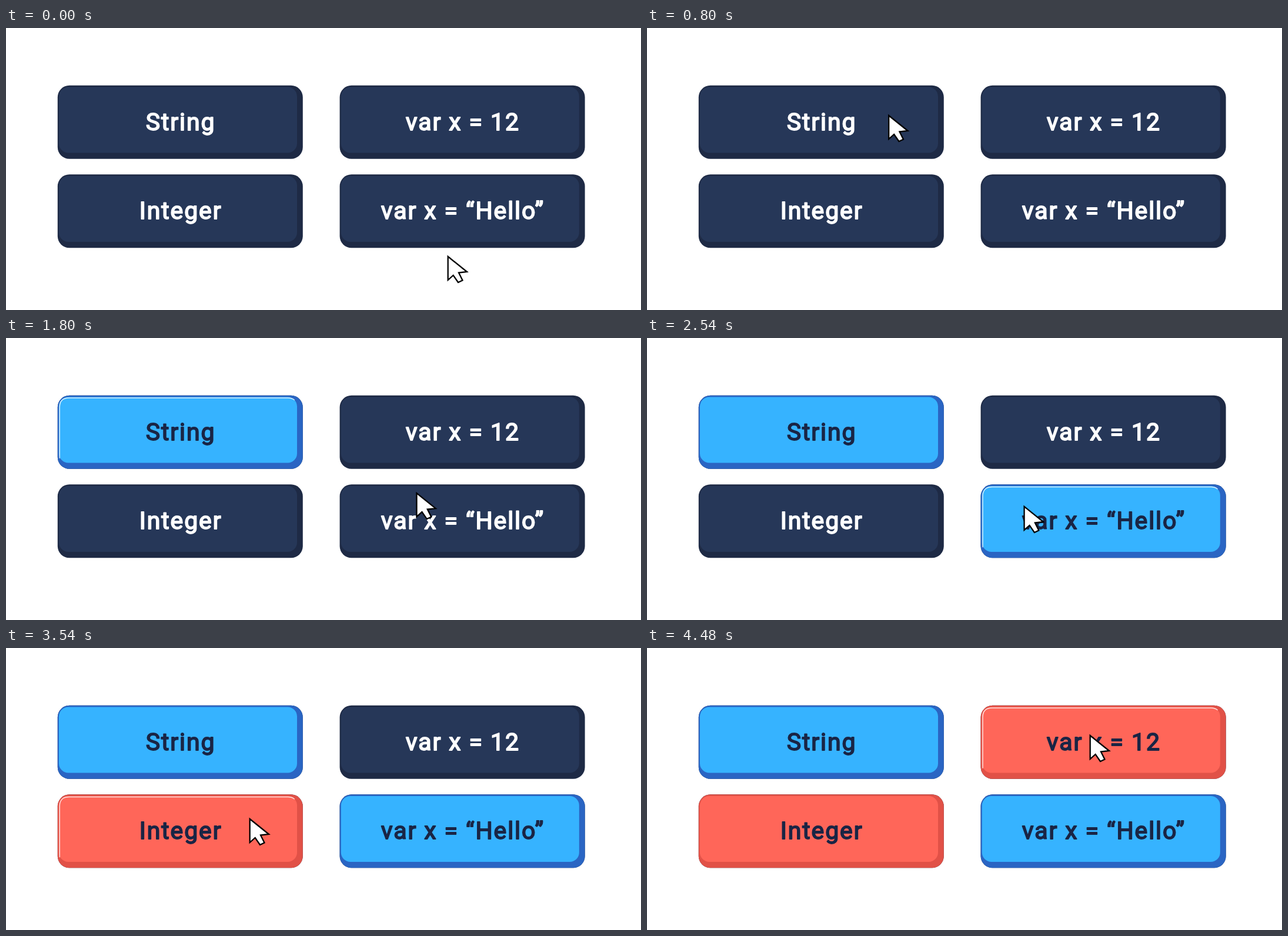
An HTML page for the animation above (5 s loop, 1080x480 px).

```html
<!DOCTYPE html>
<html lang="en">
<head>
<meta charset="utf-8">
<title>Matching cards</title>
<style>
  html, body { margin: 0; height: 100%; overflow: hidden; background: #fff; }
  svg { display: block; width: 100vw; height: 100vh; }
  text {
    font: 400 41px Roboto, Inter, sans-serif;
    letter-spacing: 1.9px;
    text-anchor: middle;
    stroke-width: 1.8;
    stroke-linejoin: round;
  }
  .shine { fill: none; stroke: #fff; stroke-width: 1.5; stroke-opacity: .8; }
</style>
</head>
<body>
<svg id="stage" viewBox="0 0 1080 480"></svg>
<script>
const LOOP = 5000, STEP = 20, FADE = 40;
const DARK = { edge: '#1e2a45', face: '#263758', ink: '#ffffff' };
const BLUE = { edge: '#2a65c3', face: '#36b3ff', ink: '#1a2545' };
const RED = { edge: '#e15147', face: '#ff6659', ink: '#1a2545' };

// In the order in which they are picked; `at` is when the new colour is complete.
const cards = [
  { label: 'String', x: 87.8, y: 97.8, look: BLUE, at: 900 },
  { label: 'var x = “Hello”', x: 567.6, y: 249.3, look: BLUE, at: 2020 },
  { label: 'Integer', x: 87.8, y: 249.3, look: RED, at: 3280 },
  { label: 'var x = 12', x: 567.6, y: 97.8, look: RED, at: 4480 },
];

// Each move slows down towards its end; a power of 1 is a steady speed.
const start = [750.5, 386];
const moves = [
  { from: 20, time: 780, to: [410, 146], power: 1 },
  { from: 1140, time: 780, to: [749.5, 282], power: 1 },
  { from: 2300, time: 860, to: [413.5, 288], power: 1.2 },
  { from: 3540, time: 820, to: [752.5, 146], power: 1.48 },
];

const face = ({ edge, face, ink }, label) => `
  <rect width="417" height="125" rx="20" fill="${edge}"/>
  <rect x="2.2" y="2.7" width="405" height="112" rx="16" fill="${face}"/>
  <text x="209.3" y="75.9" fill="${ink}" stroke="${ink}">${label}</text>`;

const stage = document.getElementById('stage');
stage.innerHTML = cards.map(c => `
  <g transform="translate(${c.x} ${c.y})">
    ${face(DARK, c.label)}
    <g class="picked">
      ${face(c.look, c.label)}
      <path class="shine" d="M3.4 107V20Q3.4 4.2 19.4 4.2H392Q399 4.2 403 8"/>
    </g>
  </g>`).join('') + `
  <path id="cursor" d="M1.2 3V43L10.2 35L18.5 47L26 43.5L19.5 30.5L33.5 29Z"
    fill="#fff" stroke="#000" stroke-width="2.3"/>`;

const picked = stage.querySelectorAll('.picked');
const shines = stage.querySelectorAll('.shine');
const cursor = document.getElementById('cursor');
const clamp = v => Math.min(1, Math.max(0, v));

function cursorAt(t) {
  let pos = start;
  for (const { from, time, to, power } of moves) {
    const p = 1 - (1 - clamp((t - from) / time)) ** power;
    pos = pos.map((v, i) => v + (to[i] - v) * p);
  }
  return pos;
}

function draw(now) {
  const t = Math.floor(now % LOOP / STEP) * STEP;
  const amount = cards.map(c => clamp((t - c.at + FADE) / FADE));
  amount.forEach((a, i) => {
    picked[i].style.opacity = a;
    shines[i].style.opacity = 1 - (amount[i + 1] ?? 0); // only the latest pick shines
  });
  cursor.setAttribute('transform', `translate(${cursorAt(t).join(' ')})`);
  requestAnimationFrame(draw);
}

draw(0);
</script>
</body>
</html>
```
